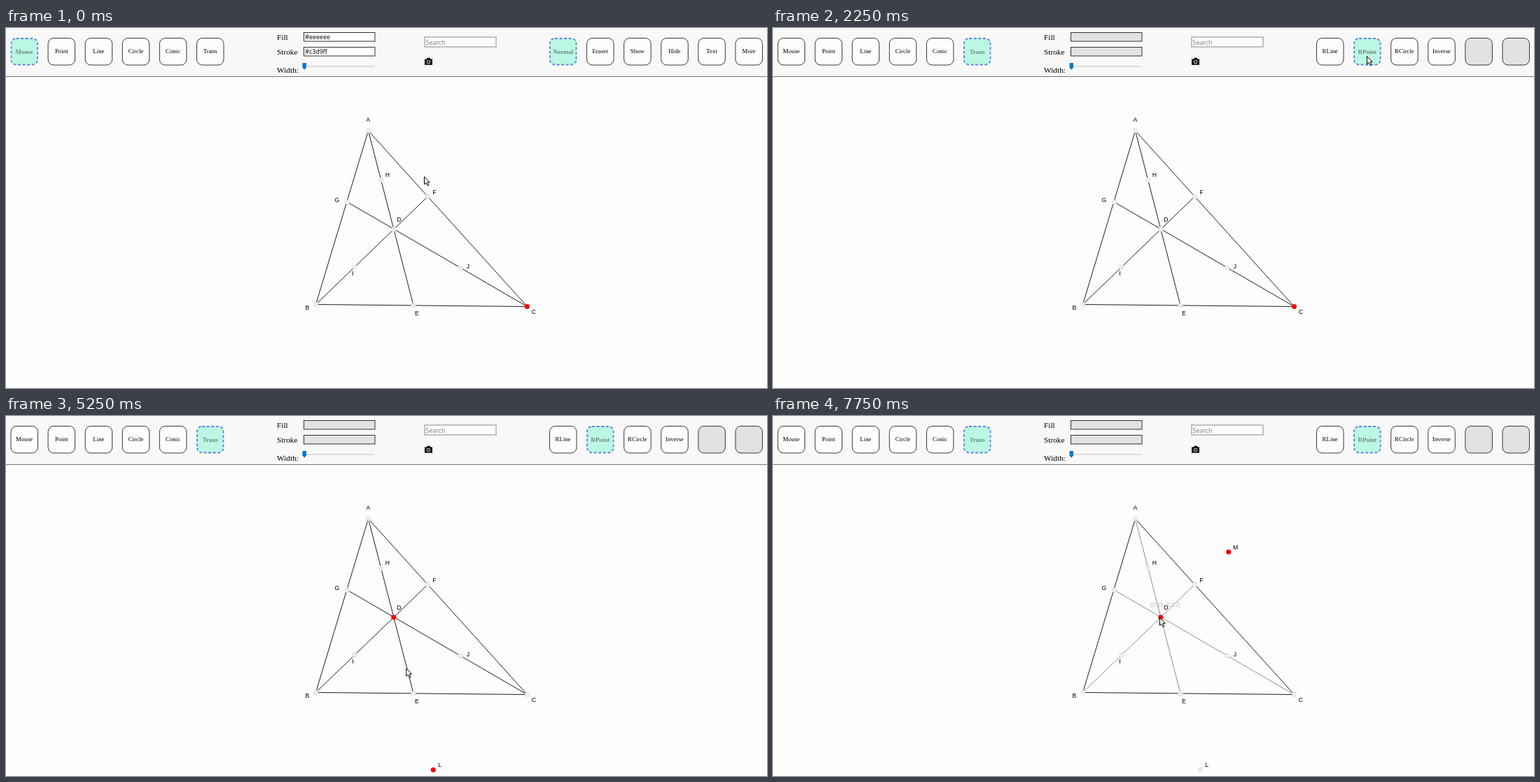
Recreate the animation shown at these times as an HTML page. Size 1087 px wide and 515 px high, loop 8000 ms.

```html
<!DOCTYPE html>
<html lang="en">
<head>
<meta charset="utf-8">
<title>Geometry board</title>
<style>
  html, body { margin: 0; width: 100%; height: 100%; overflow: hidden; background: #fdfdfd; }
  svg { display: block; }
  .serif { font-family: "Liberation Serif", serif; }
  .ui { font: 8.9px "Open Sans", sans-serif; }
  .button { font-size: 8.9px; text-anchor: middle; }
  .button.on { font-weight: bold; fill: #6f8580; }
  .label { font: 8.7px "Liberation Sans", sans-serif; text-anchor: middle; }
</style>
</head>
<body>
<svg id="stage" width="1087" height="515" viewBox="0 0 1087 515"></svg>
<script>
const LOOP = 8000, STEP = 250;
const stage = document.getElementById('stage');

const TOOLS = ['Mouse', 'Point', 'Line', 'Circle', 'Conic', 'Trans'];
const MOUSE_MODES = ['Normal', 'Eraser', 'Show', 'Hide', 'Text', 'More'];
const TRANS_MODES = ['RLine', 'RPoint', 'RCircle', 'Inverse', '', ''];

// name: [x, y, label x, label baseline]
const POINTS = {
  A: [517.5, 147, 517.5, 134], B: [442.5, 395.5, 430.5, 402.5],
  C: [744.5, 398.5, 754, 409], D: [553.8, 288, 561.5, 276.5],
  E: [582, 397, 587, 410.5], F: [602.5, 241, 612, 237.5],
  G: [487.5, 249, 473, 249], H: [535.7, 217.5, 545, 213.2],
  I: [498, 342, 495.5, 354], J: [649, 343.2, 660, 343.5],
  L: [610.3, 506.2, 619.7, 502.2], M: [650.7, 194.5, 660.7, 191]
};

// Pointer path: [ms, x, y]
const PATH = [
  [0, 597, 212], [250, 586, 226], [500, 420, 165], [750, 250, 78], [1000, 264, 40],
  [1250, 284, 41], [1500, 283, 41], [1750, 582, 66], [2000, 868, 64], [2250, 848, 40],
  [2500, 848, 40], [3000, 612, 262], [3250, 562, 309], [3750, 552, 288], [4000, 552, 288],
  [4500, 581, 401], [4750, 581, 397], [5000, 581, 397], [5750, 552, 288], [6000, 552, 288],
  [6250, 574, 268], [6500, 600, 243], [7000, 601, 241], [7500, 558, 284], [7750, 552, 288]
];

function pointerAt(t) {
  const next = Math.max(1, PATH.findIndex(key => key[0] >= t));
  const [t0, x0, y0] = PATH[next - 1], [t1, x1, y1] = PATH[next];
  const k = (t - t0) / (t1 - t0);
  return [x0 + (x1 - x0) * k, y0 + (y1 - y0) * k];
}

const during = (t, from, to) => t >= from && t < to;

const box = (x, y, w, h, fill, stroke, extra = '') =>
  `<rect x="${x}" y="${y}" width="${w}" height="${h}" fill="${fill}" stroke="${stroke}" ${extra}/>`;

const text = (x, y, words, cls, extra = '') =>
  `<text x="${x}" y="${y}" class="${cls}" ${extra}>${words}</text>`;

function button(x, name, on) {
  const face = on
    ? box(x + .5, 15, 37.5, 37.5, '#bbf7e3', '#5f83dc', 'rx="7" stroke-width="1.8" stroke-dasharray="4 2.6"')
    : box(x, 14.5, 38.5, 38.5, name ? '#fdfdfd' : '#e2e2e2', '#222', 'rx="8" stroke-width=".9"');
  return face + text(x + 19.2, on ? 36.5 : 35.5, name, 'serif button' + (on ? ' on' : ''));
}

const buttonRow = (x, names, active) =>
  names.map((name, i) => button(x + 53.1 * i, name, active.includes(name))).join('');

function toolbar(t) {
  const trans = t >= 1500;
  const tools = [trans ? 'Trans' : 'Mouse'];
  if (during(t, 750, 1250)) tools.push('Conic');
  if (during(t, 1250, 1500)) tools.push('Trans');
  const mode = !trans ? 'Normal' : t < 2250 ? 'RLine' : 'RPoint';
  const field = trans ? '#e2e2e2' : '#fdfdfd';

  return '<rect width="1087" height="69" fill="#f8f8f8"/>' +
    '<rect y="69" width="1087" height="1" fill="#777"/>' +
    buttonRow(7, TOOLS, tools) +
    buttonRow(776.5, trans ? TRANS_MODES : MOUSE_MODES, [mode]) +
    text(387, 17, 'Fill', 'serif', 'font-size="11.3"') +
    text(387, 38, 'Stroke', 'serif', 'font-size="11.3"') +
    text(387, 63.5, 'Width:', 'serif', 'font-size="11.3"') +
    box(425.5, 6.5, 101.5, 12.5, field, '#333') +
    box(425.5, 27.5, 101.5, 12.5, field, '#333') +
    (trans ? '' : text(427.3, 16.4, '#eeeeee', 'ui') + text(427.3, 37.4, '#c3d9ff', 'ui')) +
    '<rect x="424" y="54" width="102" height="2" fill="#ddd"/>' +
    '<path d="M423.5 50h5.5v6.5l-2.75 3.2l-2.75-3.2z" fill="#0875d1"/>' +
    box(598, 13, 102, 14, '#fdfdfd', '#888') +
    text(599.6, 23.5, 'Search', 'ui', 'fill="#777"') +
    '<path d="M598 44.5h3l1-1.8h3.5l1 1.8h2.5v8.3h-11z"/>' +
    '<circle cx="603.5" cy="48.6" r="2.3" fill="none" stroke="#f8f8f8"/>';
}

function segment(ends, color) {
  const [[x1, y1], [x2, y2]] = [...ends].map(name => POINTS[name]);
  return `<line x1="${x1}" y1="${y1}" x2="${x2}" y2="${y2}" stroke="${color}" stroke-width=".95"/>`;
}

function drawing(t) {
  const hovered = during(t, 3750, 4250) || during(t, 5750, 6500) || t >= 7750;
  const isRed = {
    C: t < 4000,
    D: t >= 4000,
    L: t < 6000,
    M: true
  };
  const shown = Object.keys(POINTS).filter(name =>
    name === 'L' ? t >= 4750 : name === 'M' ? t >= 6750 : true);

  const sides = ['AB', 'BC', 'CA'].map(s => segment(s, '#111')).join('');
  const medians = ['AE', 'BF', 'CG'].map(s => segment(s, hovered ? '#888' : '#111')).join('');
  const dots = shown.map(name => {
    const [x, y, labelX, labelY] = POINTS[name];
    const paint = isRed[name] ? 'fill="#f00" stroke="#e00"' : 'fill="#ebeef3" stroke="#cfdcf2"';
    return `<circle cx="${x}" cy="${y}" r="3.2" ${paint} stroke-width=".8"/>` +
      text(labelX, labelY, name, 'label');
  }).join('');
  const coords = hovered
    ? text(560.3, 272.5, '(0.15, 0.22)', 'label', 'fill="#bbb" style="font-size:8.3px"') : '';
  return sides + medians + coords + dots;
}

function pointer(t) {
  const [x, y] = pointerAt(t);
  return `<path transform="translate(${x} ${y})" fill="#fff" stroke="#000" stroke-width="1"
    d="M.5 .5v11.2l2.6-2.3l1.9 4.2l1.9-.9l-1.9-4.1h3.2z"/>`;
}

let shownTime = -1;
function tick() {
  const t = Math.floor(performance.now() % LOOP / STEP) * STEP;
  if (t !== shownTime) {
    shownTime = t;
    stage.innerHTML = toolbar(t) + drawing(t) + pointer(t);
  }
  requestAnimationFrame(tick);
}
tick();
</script>
</body>
</html>
```
